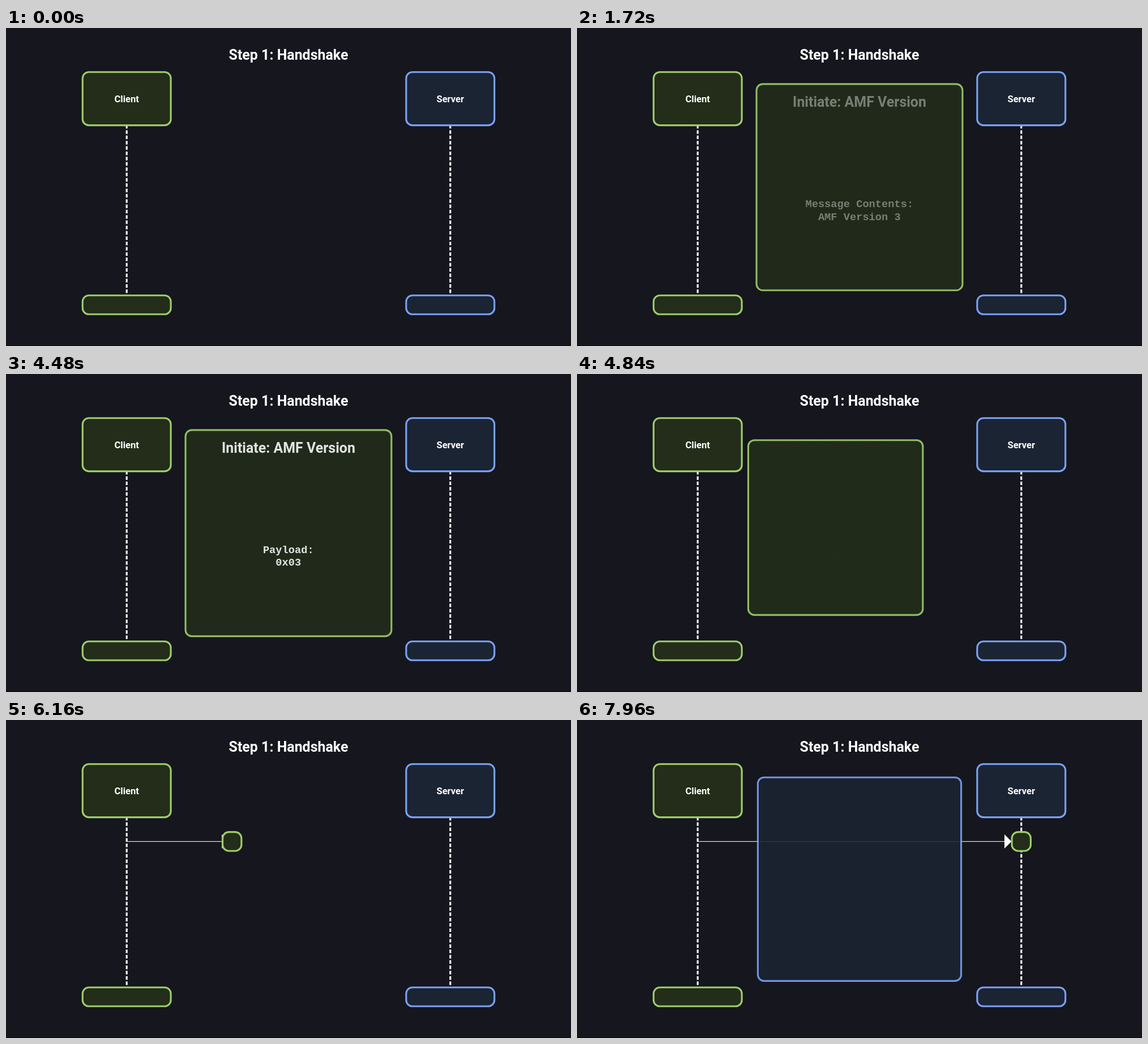
Animation of 998x561 px, one loop 8 s. Source, as an HTML page:

```html
<!DOCTYPE html>
<html lang="en">
<head>
<meta charset="utf-8">
<title>Handshake</title>
<style>
  html, body { margin: 0; width: 100%; height: 100%; overflow: hidden; background: #16161e; }
  svg { display: block; width: 100%; height: 100%; }
  text { fill: #fff; text-anchor: middle; font-weight: 700; font-family: Roboto, sans-serif; }
  .head { font-size: 24.95px; }
  .label { font-size: 16.63px; }
  .code { font-size: 18.71px; font-family: "Liberation Mono", monospace; }
  .green { fill: #232d1a; stroke: #9ece6a; }
  .blue { fill: #1b2433; stroke: #7aa2f7; }
  .green, .blue { stroke-width: 3.12; }
  .life { stroke: #fff; stroke-width: 3.12; stroke-dasharray: 6.24 3.12; }
</style>
</head>
<body>
<svg viewBox="0 0 998 561">
  <rect y="560" width="998" height="1" fill="#08080b"/>
  <path class="life" d="M213.2 171.1V469M784.8 171.1V469"/>
  <g id="actors"></g>
  <text class="head" x="499" y="55.8">Step 1: Handshake</text>
  <text class="label" x="213.2" y="130.6">Client</text>
  <text class="label" x="784.8" y="130.6">Server</text>
  <g id="arrow" fill="#fff">
    <rect id="shaft" x="213.2" y="213.8" height="1.05"/>
    <path id="tip" d="M-12.5 -12.5L0 0L-12.5 12.5Z"/>
  </g>
  <g id="request">
    <rect class="green" id="card"/>
    <g id="words">
      <text class="head" x="499" y="138.8">Initiate: AMF Version</text>
      <text class="code" id="line0" y="316"></text>
      <text class="code" id="line1" y="338.5"></text>
    </g>
  </g>
  <rect class="blue" id="reply"/>
</svg>
<script>
const LOOP = 8000, STEP = 40;
const SMALL = 36.4, LARGE = 367, STROKE = 3.12;
const MID = { x: 499, y: 280.8 }, FROM = { x: 213.2, y: 214.3 }, TO_X = 784.8;
const COLS = 17, CELL = 11.23;
const OLD = "Message Contents: AMF Version 3", NEW = "Payload:0x03";

const $ = id => document.getElementById(id);
const set = (el, attrs) => { for (const k in attrs) el.setAttribute(k, attrs[k]); };

const linear = u => u;
const quadOut = u => 1 - (1 - u) ** 2;
const cubicInOut = u => u < .5 ? 4 * u ** 3 : 1 - 4 * (1 - u) ** 3;
const tween = (t, start, length, ease) =>
  ease(Math.min(1, Math.max(0, (t - start) / length)));
const mix = (a, b, p) => a + (b - a) * p;

// w and h include the stroke
function box(el, cx, cy, w, h = w) {
  set(el, {
    x: cx - (w - STROKE) / 2, y: cy - (h - STROKE) / 2,
    width: w - STROKE, height: h - STROKE, rx: 11
  });
}

for (const [color, x] of [["green", FROM.x], ["blue", TO_X]]) {
  for (const [y, h] of [[124.7, 97], [488.4, SMALL]]) {
    const el = document.createElementNS("http://www.w3.org/2000/svg", "rect");
    set(el, { class: color });
    box(el, x, y, 159, h);
    $("actors").append(el);
  }
}

function wrap(text) {
  const lines = [];
  for (const word of text.split(" ")) {
    const last = lines.length - 1;
    if (last >= 0 && lines[last].length + 1 + word.length <= COLS) lines[last] += " " + word;
    else lines.push(word);
  }
  return lines;
}

// New characters overwrite the old ones from the left
function message(p) {
  if (p === 1) return ["Payload:", "0x03"];
  const n = Math.floor(p * OLD.length + .5);
  return wrap(NEW.slice(0, n) + OLD.slice(n));
}

function showMessage(lines) {
  for (const i of [0, 1]) {
    const s = lines[i] || "";
    const over = Math.max(0, s.length - COLS);
    const el = $("line" + i);
    el.textContent = s;
    set(el, { x: 498.8 + over * CELL / 2 });
  }
}

function render(t) {
  // request card: appear, grow, shrink to the client, travel to the server
  const grow = tween(t, 956, 500, quadOut);
  const shrink = tween(t, 4423, 1200, cubicInOut);
  const move = tween(t, 4440, 1200, cubicInOut);
  const send = tween(t, 5640, 1200, cubicInOut);
  const size = mix(mix(SMALL, LARGE, grow), SMALL, shrink);
  const x = mix(mix(MID.x, FROM.x, move), TO_X, send);
  const y = mix(MID.y, FROM.y, move);
  box($("card"), x, y, size);
  set($("request"), { opacity: mix(.9 * tween(t, 420, 400, quadOut), 1, move) });

  const shown = tween(t, 1620, 400, quadOut) - tween(t, 4475, 400, quadOut);
  set($("words"), {
    opacity: shown,
    transform: `translate(${x - MID.x} ${y - MID.y})`
  });
  showMessage(message(tween(t, 2995, 500, linear)));

  const tip = mix(FROM.x, 767.5, send);
  set($("arrow"), { visibility: send > 0 ? "visible" : "hidden" });
  set($("shaft"), { width: Math.max(0, tip - 12 - FROM.x) });
  set($("tip"), { transform: `translate(${tip} ${FROM.y})` });

  box($("reply"), MID.x, MID.y, mix(SMALL, LARGE, tween(t, 7520, 500, quadOut)));
  set($("reply"), { opacity: .9 * tween(t, 6980, 400, quadOut) });
}

const begin = performance.now();
function frame(now) {
  const t = Math.max(0, now - begin) % LOOP;
  render(Math.floor(t / STEP) * STEP);
  requestAnimationFrame(frame);
}
render(0);
requestAnimationFrame(frame);
</script>
</body>
</html>
```
